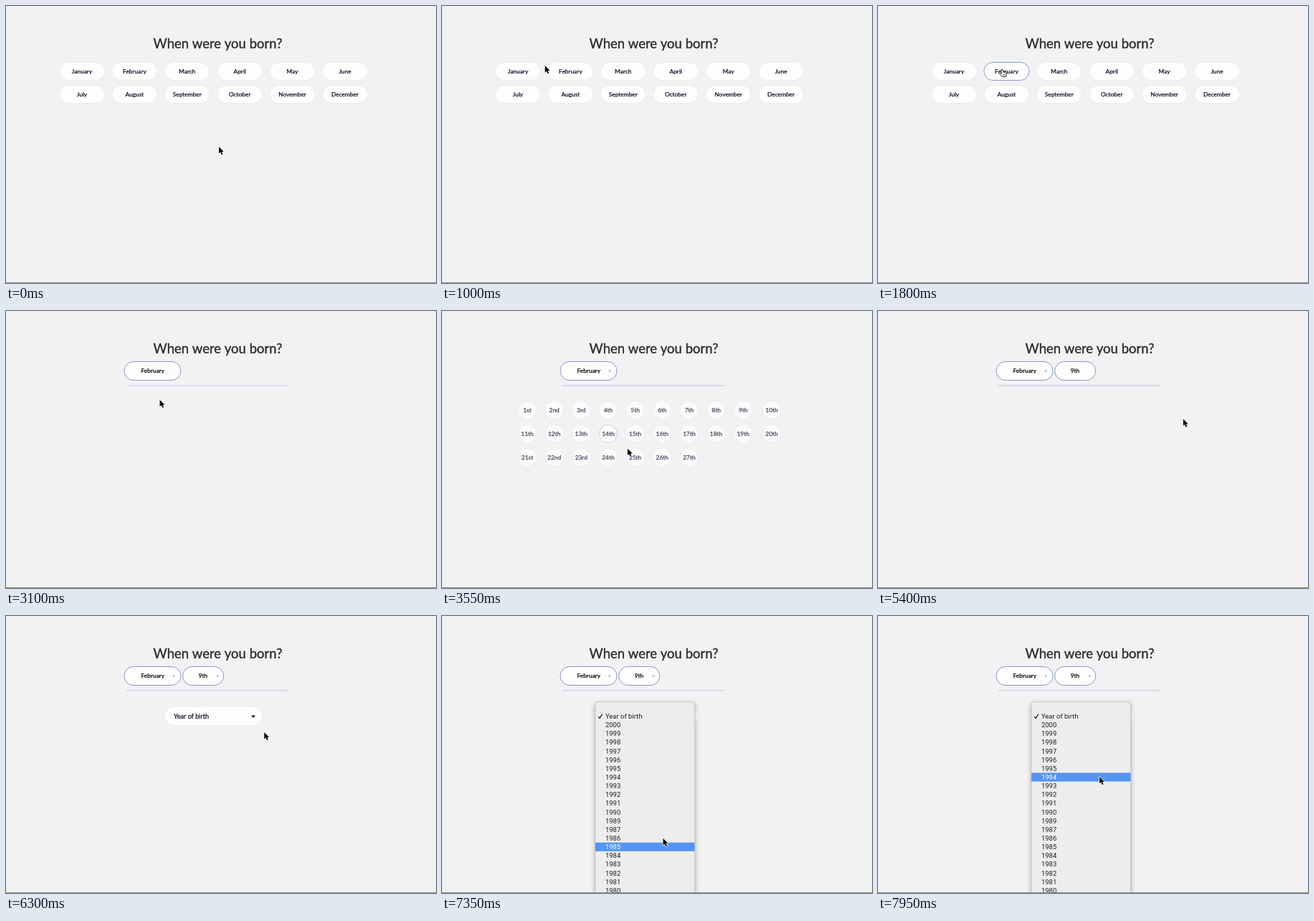
Animation of 600 by 386 pixels, one loop 8000 ms. Source, as an HTML page with a canvas:

```html
<!DOCTYPE html>
<html lang="en">
<head>
<meta charset="utf-8">
<title>When were you born?</title>
<style>
  html, body { margin: 0; width: 100%; height: 100%; overflow: hidden; background: #f2f2f3; }
  canvas { display: block; }
</style>
</head>
<body>
<canvas id="stage" width="600" height="386"></canvas>
<script>
const ctx = document.getElementById('stage').getContext('2d');
const LOOP = 8000, PICK_MONTH = 2740, PICK_DAY = 5190, OPEN_MENU = 6690;
const INK = '#10132e', BLUE = '#8798c9';
const UI = 'Lato, sans-serif', MENU = 'Roboto, sans-serif';

const months = 'January February March April May June July August September October November December'
  .split(' ').map((label, i) => ({ label, x: 106 + i % 6 * 73.4, y: i < 6 ? 91 : 123, w: 63, h: 25 }));
const suffix = n => n > 10 && n < 14 ? 'th' : ['th', 'st', 'nd', 'rd'][n % 10] || 'th';
const days = Array.from({ length: 27 }, (_, i) => ({
  label: i + 1 + suffix(i + 1),
  x: i % 10 === 9 ? 460 : 119 + i % 10 * 37.65, y: 138 + Math.floor(i / 10) * 33, w: 25, h: 25
}));
const years = ['Year of birth'];
for (let y = 2000; y >= 1980; y--) if (y !== 1988) years.push(String(y));

// Pointer path: time, x, y and, where it rests, the end of the rest
const path = [
  [0, 297, 196, 60], [150, 278, 208], [350, 211.5, 123, 610], [700, 186, 130], [800, 139, 86, 960],
  [1120, 178, 68], [1300, 213, 98], [1380, 232, 106.5], [1550, 176, 90, 1710], [1800, 172.5, 88],
  [2030, 232, 106.5], [2250, 186, 92, 2760], [3100, 214.5, 123.5], [3200, 224, 150, 3310],
  [3700, 288, 212], [4050, 330.5, 172, 4215], [4250, 339.5, 166], [4480, 422, 137],
  [4650, 396, 153, 4810], [4900, 422, 141, 5250], [5500, 428, 158], [6000, 397, 174],
  [6150, 361, 164, 6260], [6300, 360.5, 162], [6600, 309, 139, 6860], [7150, 309, 318, 7310],
  [7350, 308.5, 310], [7800, 308, 209], [7950, 309, 224, LOOP]
].flatMap(([t, x, y, until]) => until ? [[t, x, y], [until, x, y]] : [[t, x, y]]);

const clamp = v => Math.max(0, Math.min(1, v));
const ramp = (t, from, to) => clamp((t - from) / (to - from));

function slope(i, axis) {
  const a = path[i - 1], b = path[i], c = path[i + 1];
  if (!a || !c) return 0;
  const before = b[axis] - a[axis], after = c[axis] - b[axis];
  return before * after <= 0 ? 0 : (before + after) / (c[0] - a[0]);
}

function pointer(t) {
  t = Math.max(0, t);
  const i = Math.max(1, path.findIndex(p => p[0] >= t));
  const a = path[i - 1], b = path[i], d = b[0] - a[0], u = (t - a[0]) / d, v = 1 - u;
  const at = k => a[k] * v * v * (1 + 2 * u) + b[k] * u * u * (3 - 2 * u)
    + d * u * v * (v * slope(i - 1, k) - u * slope(i, k));
  return { x: at(1), y: at(2) };
}

function inside(p, box) {
  const r = box.h / 2, flat = box.w / 2 - r;
  return Math.hypot(Math.max(0, Math.abs(p.x - box.x) - flat), p.y - box.y) < r;
}

// Average of recent hover states, giving a short border fade
function hover(t, box) {
  let sum = 0;
  for (let k = 0; k < 6; k++) sum += inside(pointer(t - 10 - k * 22), box);
  return sum / 6;
}

function faded(alpha, draw) {
  if (alpha <= 0) return;
  ctx.save();
  ctx.globalAlpha *= alpha;
  draw();
  ctx.restore();
}

function text(str, x, y, size, { align = 'center', color = INK, font = UI, heavy = 0.25 } = {}) {
  ctx.font = `${size}px ${font}`;
  ctx.textAlign = align;
  ctx.fillStyle = ctx.strokeStyle = color;
  ctx.fillText(str, x, y);
  if (heavy) {
    ctx.lineWidth = heavy;
    ctx.strokeText(str, x, y);
  }
}

function pill({ x, y, w, h }, border) {
  ctx.beginPath();
  ctx.roundRect(x - w / 2, y - h / 2, w, h, h / 2);
  ctx.fillStyle = '#fdfdfe';
  ctx.fill();
  ctx.lineWidth = 1;
  ctx.strokeStyle = border;
  ctx.stroke();
}

function choice(t, box) {
  pill(box, '#ecebef');
  faded(hover(t, box), () => pill(box, BLUE));
  text(box.label, box.x, box.y + 2.7, 8.4);
}

function chip(label, x, w, textX, crossX, t, start) {
  faded(ramp(t, start, start + 200), () => {
    pill({ x, y: 83.5, w, h: 26 }, BLUE);
    text(label, textX, 86, 8.4, { color: '#08080f' });
    faded(ramp(t, start + 290, start + 700), () => {
      ctx.strokeStyle = '#9aa8d0';
      ctx.lineWidth = 1;
      ctx.beginPath();
      for (const s of [-1, 1]) {
        ctx.moveTo(crossX - 1.5, 83.8 - 1.5 * s);
        ctx.lineTo(crossX + 1.5, 83.8 + 1.5 * s);
      }
      ctx.stroke();
    });
  });
}

const caret = new Path2D('M342 138.5H348L345 142Z');
const tick = new Path2D('M218.2 140.3L220.2 142.5 223.6 136.8');

function select() {
  pill({ x: 289.5, y: 139.5, w: 137, h: 27 }, '#ecebef');
  text('Year of birth', 234, 142.6, 9.1, { align: 'left' });
  ctx.fill(caret);
}

function menu(t) {
  ctx.save();
  ctx.shadowColor = 'rgba(0,0,0,.35)';
  ctx.shadowBlur = 7;
  ctx.shadowOffsetY = 2;
  ctx.fillStyle = '#ededed';
  ctx.beginPath();
  ctx.roundRect(214, 120, 138.5, 300, 3);
  ctx.fill();
  ctx.restore();
  ctx.lineWidth = 0.6;
  ctx.strokeStyle = '#bdbdbd';
  ctx.stroke();

  const row = 12.15;
  const active = Math.max(0, Math.floor((pointer(t - 50).y - 133.4) / row));
  years.forEach((label, i) => {
    const y = 139.5 + i * row, color = i === active ? '#fff' : '#1c1c1c';
    if (i === active) {
      ctx.fillStyle = '#5694f3';
      ctx.fillRect(214, y - row / 2, 138.5, row);
    }
    text(label, 228, y + 3.4, 9.45, { align: 'left', color, font: MENU, heavy: 0 });
    if (i) return;
    ctx.lineWidth = 1.3;
    ctx.stroke(tick);
  });
}

const arrow = new Path2D('M0 0V9.6L2.2 7.6 3.8 11.2 5.5 10.4 4 7H6.9Z');
const hand = new Path2D('M-1 1L1 0 2.2 3.4 5.7 3.8 7 5V7.6L5.8 10.6H.6L-3 5.8-2 4.6-.1 6.2Z');
const fingers = new Path2D('M2.2 3.4v2M4 3.6v2M5.7 4v2M1.8 7v2M3.3 7v2M4.8 7v2');

function drawPointer(t, targets) {
  const p = pointer(t);
  ctx.save();
  ctx.translate(p.x, p.y);
  ctx.lineJoin = 'round';
  if (targets.some(box => inside(p, box))) {
    ctx.fillStyle = '#fff';
    ctx.strokeStyle = '#111';
    ctx.lineWidth = 0.9;
    ctx.fill(hand);
    ctx.stroke(hand);
    ctx.lineWidth = 0.6;
    ctx.stroke(fingers);
  } else {
    ctx.strokeStyle = '#fff';
    ctx.lineWidth = 1.5;
    ctx.stroke(arrow);
    ctx.fillStyle = '#000';
    ctx.fill(arrow);
  }
  ctx.restore();
}

function draw(t) {
  ctx.fillStyle = '#f2f2f3';
  ctx.fillRect(0, 0, 600, 386);
  text('When were you born?', 295.5, 59, 18.5, { color: '#2a2a2d', heavy: 0.35 });

  faded(1 - ramp(t, PICK_MONTH, PICK_MONTH + 150), () => months.forEach(m => choice(t, m)));
  faded(ramp(t, PICK_MONTH, PICK_MONTH + 500), () => {
    ctx.fillStyle = '#b9c7e8';
    ctx.fillRect(168, 103.5, 226.5, 1);
  });
  chip('February', 204.5, 79, 204.8, 234, t, PICK_MONTH);
  chip('9th', 275.2, 57, 275, 295, t, PICK_DAY);

  faded(ramp(t, 3300, 3650) * (1 - ramp(t, PICK_DAY, PICK_DAY + 150)),
    () => days.forEach(d => choice(t, d)));
  faded(ramp(t, 5750, 6150), select);
  if (t >= OPEN_MENU) menu(t);

  ctx.fillStyle = '#858585';
  ctx.fillRect(0, 385, 600, 1);
  drawPointer(t, t < PICK_MONTH ? months : t > 3300 && t < PICK_DAY ? days : []);
}

function frame() {
  draw(performance.now() % LOOP);
  requestAnimationFrame(frame);
}
frame();
</script>
</body>
</html>
```
